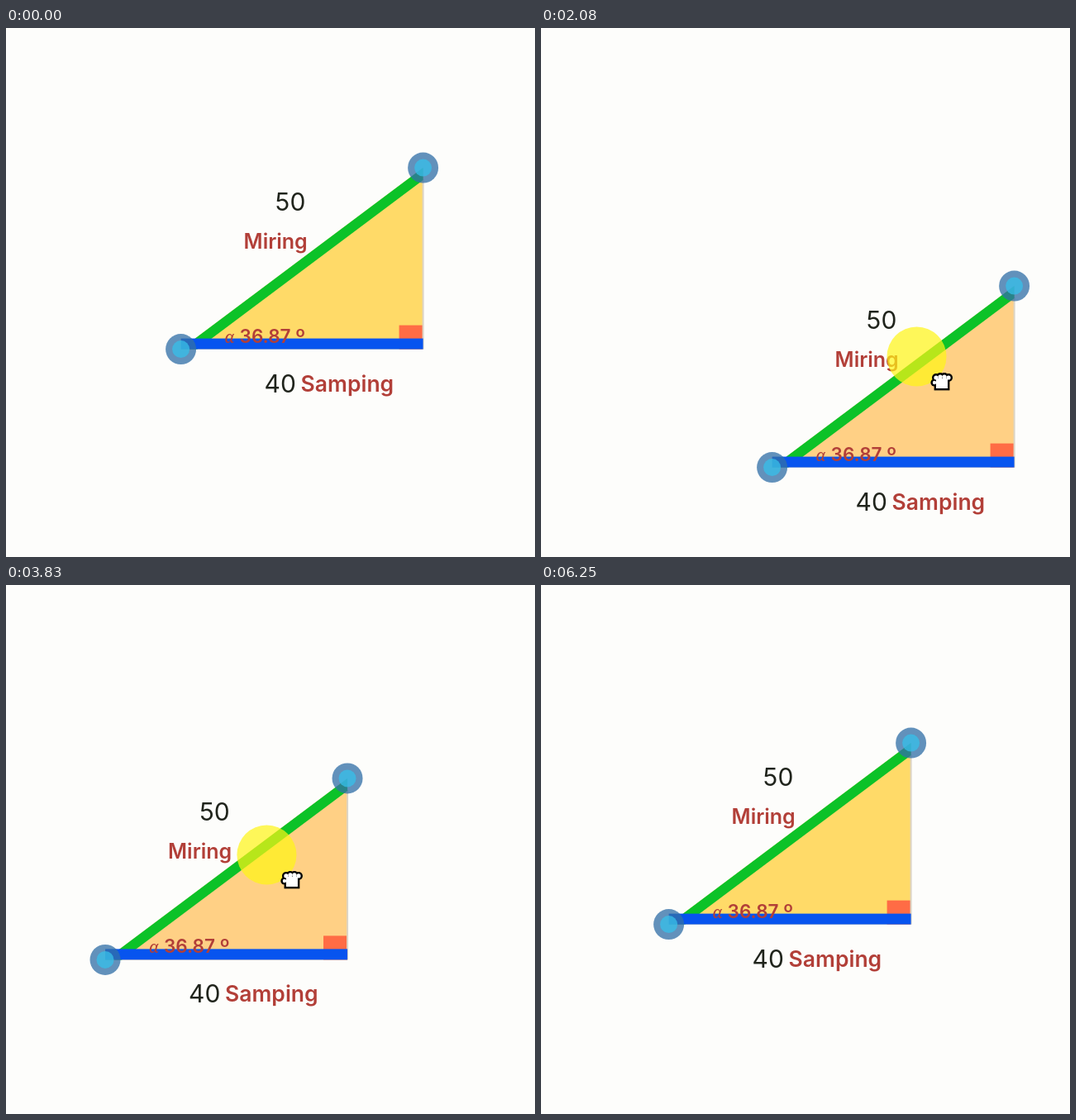
An HTML page with a canvas for the animation above (6510 ms loop, 640x640 px).

```html
<!DOCTYPE html>
<html lang="id">
<head>
<meta charset="utf-8">
<title>Segitiga siku-siku</title>
<style>
  html, body { margin: 0; width: 100%; height: 100%; overflow: hidden; background: #fdfdfb; }
  canvas { display: block; width: 640px; height: 640px; }
</style>
</head>
<body>
<canvas id="stage" width="640" height="640"></canvas>
<script>
const ctx = document.getElementById('stage').getContext('2d');
const LOOP = 6510, STEP = 1000 / 12;
const W = 293, H = 219.5, BAR = 13;
const SANS = 'Inter, "Open Sans", sans-serif';
const BROWN = '#b23f38', DARK = '#20241c';
const GRIP = { x: 216, y: -85 };
const ENTER = 3, GRAB = 10, RELEASE = 62, GONE = 71;

// Turning points of the triangle's left corner; a smooth curve joins them
const PATH = [
  [10, 211, 388], [14, 181, 397], [15, 178, 399], [18, 150, 427],
  [25, 279, 531], [26, 268, 513], [34, 124, 361], [35, 96, 369],
  [41, 27, 494], [42, 75, 493], [52, 154, 410]
].map(([k, x, y]) => ({ k, x, y }));

function slope(i, axis) {
  const a = PATH[i - 1], b = PATH[i + 1];
  return a && b ? (b[axis] - a[axis]) / (b.k - a.k) : 0;
}

function curve(k, axis) {
  const last = PATH.length - 1;
  k = Math.min(Math.max(k, PATH[0].k), PATH[last].k);
  const i = Math.max(1, PATH.findIndex(p => p.k >= k));
  const a = PATH[i - 1], b = PATH[i], d = b.k - a.k;
  const u = (k - a.k) / d, v = 1 - u;
  return v * v * ((1 + 2 * u) * a[axis] + u * d * slope(i - 1, axis)) +
    u * u * ((3 - 2 * u) * b[axis] - v * d * slope(i, axis));
}

function poly(color, ...pts) {
  ctx.fillStyle = color;
  ctx.beginPath();
  pts.forEach(p => ctx.lineTo(...p));
  ctx.fill();
}

function rect(color, x, y, w, h) {
  ctx.fillStyle = color;
  ctx.fillRect(x, y, w, h);
}

function disc(color, x, y, r) {
  ctx.fillStyle = color;
  ctx.beginPath();
  ctx.arc(x, y, r, 0, 2 * Math.PI);
  ctx.fill();
}

function ring(x, y, r) {
  ctx.beginPath();
  ctx.arc(x, y, r, 0, 2 * Math.PI);
  ctx.stroke();
}

function label(str, x, y, style, color = BROWN, family = SANS) {
  ctx.font = style + ' ' + family;
  ctx.fillStyle = color;
  ctx.fillText(str, x, y);
}

function handle(x, y) {
  disc('rgba(50,112,168,.76)', x, y, 18.5);
  disc('rgba(55,190,232,.76)', x, y, 10.5);
}

function triangle(x, y, held) {
  ctx.save();
  ctx.translate(x + 0.6, y + 0.6);
  poly(held ? '#ffd085' : '#ffda68', [0, 0], [W, -H], [W, 0]);
  rect('#ff6c45', W - 29, -29, 29, 29);
  rect('#ddd4c4', W - 1, 14 - H, 2, H - 14);
  poly('#0cc228', [0, 0], [W, -H], [W, 15 - H], [20, 0]);
  rect('#0754ef', 0, -BAR, W, BAR);
  handle(0, 0);
  handle(W, -H);
  label('50', 114, -168, '400 30px', DARK);
  label('40', 101, 52, '400 30px', DARK);
  label('Miring', 76, -122, '600 25px');
  label('Samping', 145, 51, '600 26.5px');
  label('α', 53, -8, 'italic 400 20px', BROWN, '"Noto Serif", serif');
  label('36.87', 71, -8, '600 22.5px');
  label('º', 139, -8, '600 23px');
  ctx.restore();
}

function ripple(age) {
  if (age < 0 || age > 6) return;
  ctx.globalAlpha = 0.75 - 0.09 * age;
  ctx.strokeStyle = '#76ad55';
  ctx.lineWidth = 2.6;
  ring(416.5, 302.5, 8 + 3 * age);
  ring(416.5, 302.5, 6);
  ctx.globalAlpha = 1;
}

function fist(color, grow) {
  for (let i = 0; i < 4; i++) disc(color, 5 * i - 6, -5 - (i % 3 ? 1 : 0), 2.6 + grow);
  disc(color, -8, 1, 2.2 + grow);
  rect(color, -6 - grow, -4 - grow, 14 + 2 * grow, 12 + 2 * grow);
}

function cursor(x, y) {
  disc('rgba(255,246,20,.7)', x - 29.5, y - 30.5, 36);
  ctx.save();
  ctx.translate(x, y);
  fist('#000', 2.4);
  fist('#fff', 0);
  ctx.restore();
}

// The hand leads the dragged triangle by one step
function pointer(k) {
  if (k < ENTER || k >= GONE) return;
  const away = Math.max(0, (7 - k) / 5, (k - RELEASE) / 8) ** 2;
  cursor(curve(k + 1, 'x') + GRIP.x + 130 * away,
    curve(k + 1, 'y') + GRIP.y + 390 * away);
}

function draw(ms) {
  const k = Math.floor((ms % LOOP + 4) / STEP);
  rect('#fdfdfb', 0, 0, 640, 640);
  triangle(curve(k, 'x'), curve(k, 'y'), k > GRAB && k <= RELEASE);
  ripple(k - GRAB - 1);
  pointer(k);
}

const start = performance.now();
function tick() {
  draw(performance.now() - start);
  requestAnimationFrame(tick);
}
tick();
</script>
</body>
</html>
```
